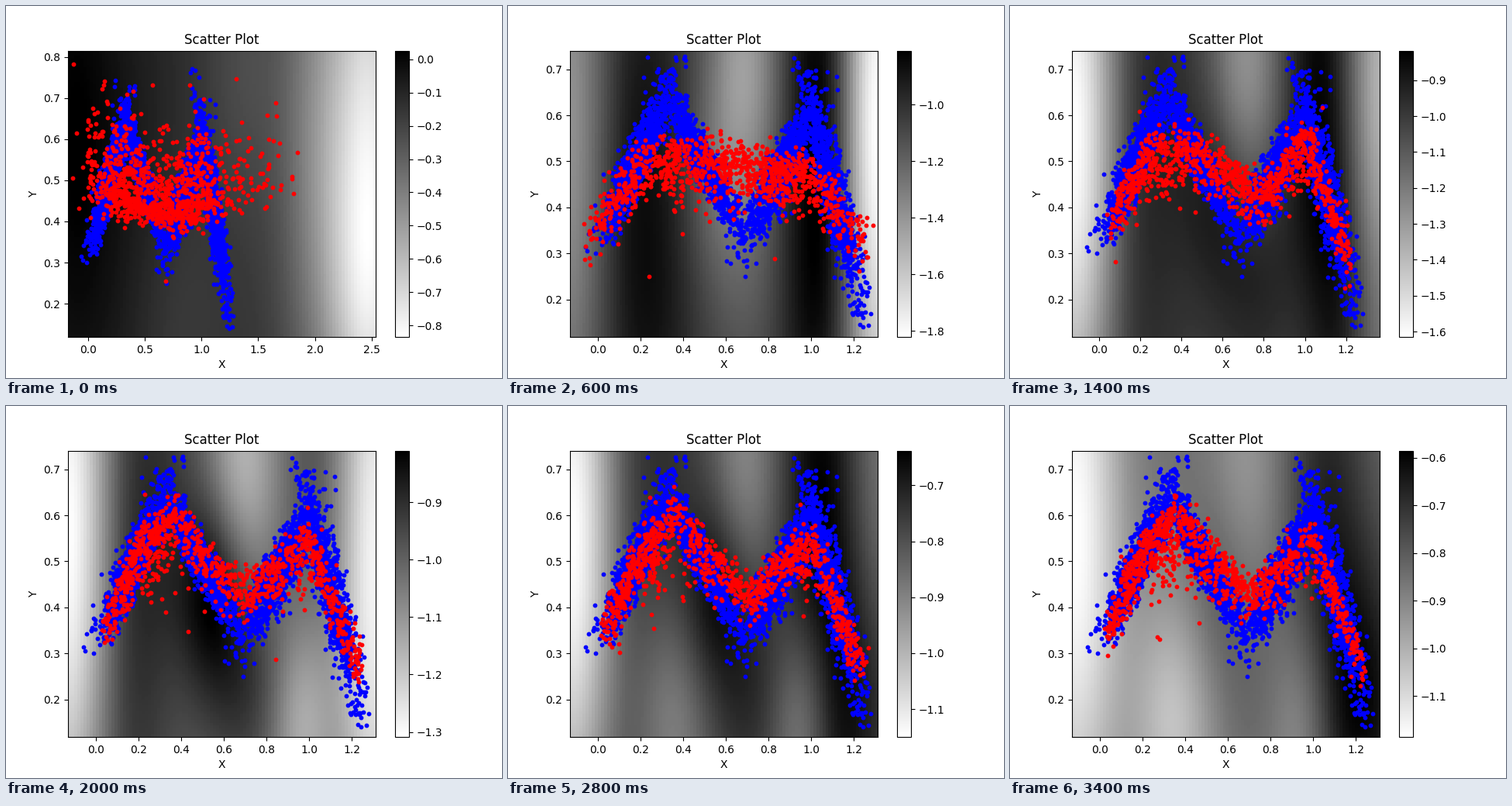
Animation of 640x480 px, one loop 3.6 s. Source, as a matplotlib script:

```python
import numpy as np
import matplotlib.pyplot as plt
from matplotlib.animation import FuncAnimation

FRAMES, STEP = 18, 200

# Axis limits: x min, x max, y min, y max
HOME = (-.131, 1.311, .118, .7405)
LIMIT_STEPS = [0, 2, 3, 5, 7, 8]
LIMITS = [(-.178, 2.535, .119, .815), (-.288, 1.497, .0903, .7405),
          HOME, HOME, (-.131, 1.362, .118, .7405), HOME]

# Lowest and highest score on the colour bar
SCORE_STEPS = [0, 2, 5, 7, 10, 13, 14, 16, 17]
SCORES = [(-.835, .026), (-1.942, -.72), (-1.583, -.985), (-1.615, -.818),
          (-1.309, -.81), (-1.12, -.685), (-1.15, -.638), (-1.0, -.62),
          (-1.186, -.585)]

# Centre line of the generated points as it learns the M shape
PATH_STEPS = [0, 2, 5, 9]
PATHS = [
    [(-.1, .57), (.2, .49), (.45, .45), (.8, .43), (1.1, .47), (1.9, .56)],
    [(-.17, .26), (.13, .46), (.4, .545), (.75, .5), (1.0, .41), (1.32, .3)],
    [(.1, .42), (.3, .53), (.67, .42), (.88, .42), (1.02, .56), (1.2, .3)],
    [(.03, .34), (.19, .51), (.36, .595), (.7, .42), (1.0, .54), (1.24, .26)],
]

# Bumps of the score field in axes units: centre, widths, heights per step
BUMP_STEPS = [0, 2, 5, 10, 17]
BUMPS = [
    ((0, .7), (.11, .8), (.2, -.12, -.55, -.5, -.55)),        # left edge
    ((.2, .5), (.13, .8), (.1, .27, .05, .2, 0)),             # left slope
    ((.33, .05), (.1, .35), (-.06, .05, 0, -.05, -.32)),      # below left peak
    ((.47, .5), (.08, .25), (0, -.12, 0, .25, .12)),          # middle slope
    ((.57, .95), (.09, .35), (-.1, -.28, -.2, -.25, -.15)),   # above valley
    ((.6, .2), (.1, .25), (0, -.1, .05, .12, .05)),           # below valley
    ((.76, .05), (.08, .3), (0, .05, .05, -.25, -.25)),       # below right peak
    ((.83, .8), (.1, .7), (-.36, .25, .28, .05, .27)),        # right slope
    ((.95, .1), (.12, .4), (-.2, 0, .3, 0, .35)),             # lower right
    ((1, .6), (.09, .9), (-.7, -.75, -.35, -.42, 0)),         # right edge
]


def ease(k, steps, rows):
    """Interpolate whole rows of values at step k."""
    rows = np.array(rows, float)
    flat = rows.reshape(len(rows), -1)
    return np.array([np.interp(k, steps, col) for col in flat.T]
                    ).reshape(rows.shape[1:])


def score_field(k, lo, hi):
    u, v = np.meshgrid(np.linspace(0, 1, 100), np.linspace(0, 1, 100))
    g = np.zeros_like(u)
    for (cu, cv), (su, sv), heights in BUMPS:
        height = np.interp(k, BUMP_STEPS, heights)
        g += height * np.exp(-((u - cu) / su)**2 / 2 - ((v - cv) / sv)**2 / 2)
    return lo + (hi - lo) * (g - g.min()) / np.ptp(g)


def real_samples():
    """Four crossing elongated clouds that form an M."""
    rng = np.random.RandomState(4)
    parts = []
    for cx, cy, slope, across in [(.18, .5, .88, .036), (.5, .495, -.79, .027),
                                  (.85, .47, .75, .036), (1.1, .44, -1.5, .053)]:
        along, off = rng.randn(2, 1000)
        dx = along * (.083 if abs(slope) < 1 else .066)
        parts.append(np.c_[cx + dx, cy + slope * dx + across * off])
    return np.vstack(parts)


def fake_samples(k, count=1000):
    rng = np.random.RandomState(100 + k)
    nodes = ease(k, PATH_STEPS, PATHS)
    taper = np.interp(k, [0, 5], [2, 1.2])
    u = rng.beta(taper, taper, count) * (len(nodes) - 1)
    x, y = (np.interp(u, range(len(nodes)), col) for col in nodes.T)

    # a few points stray far; high parts of the line drip downwards
    n = rng.randn(count) * np.where(rng.rand(count) < .02, 2.5, 1)
    up = np.interp(k, [0, 2, 5], [.085, .03, .024])
    down = .027 + .3 * np.maximum(y - .45, 0)
    x += rng.randn(count) * np.interp(k, [0, 2, 5], [.06, .025, .015])
    return np.c_[x, y + n * np.where(n > 0, up, down)]


fig, ax = plt.subplots(figsize=(6.4, 4.8), dpi=100)
field = ax.imshow(score_field(0, *SCORES[0]), cmap="gray_r", aspect="auto",
                  origin="lower", interpolation="nearest")
fig.colorbar(field, ax=ax)
real = ax.scatter(*real_samples().T, s=10, c="blue")
fake = ax.scatter([], [], s=10, c="red")
ax.set(title="Scatter Plot", xlabel="X", ylabel="Y")


def draw(k):
    x0, x1, y0, y1 = ease(k, LIMIT_STEPS, LIMITS)
    lo, hi = ease(k, SCORE_STEPS, SCORES)
    field.set_data(score_field(k, lo, hi))
    field.set_clim(lo, hi)
    field.set_extent((x0, x1, y0, y1))
    ax.set(xlim=(x0, x1), ylim=(y0, y1))
    fake.set_offsets(fake_samples(k))
    return field, fake


anim = FuncAnimation(fig, draw, frames=FRAMES, interval=STEP, repeat=True)
plt.show()
```
